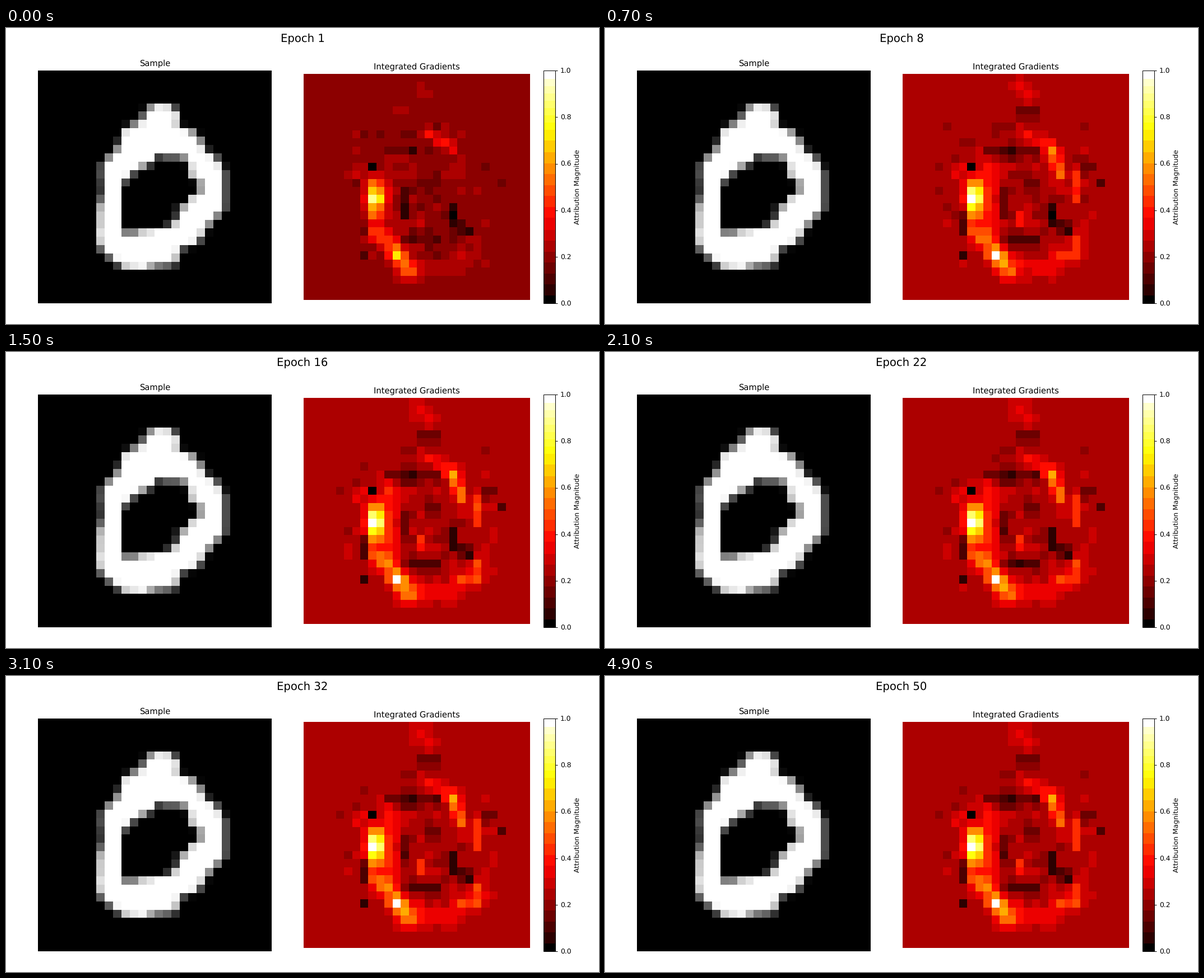
A matplotlib script that plays this animation: 1058 px wide and 529 px high, repeating every 5000 ms.

```python
import numpy as np
import matplotlib.pyplot as plt
from matplotlib.animation import FuncAnimation
from matplotlib.cm import ScalarMappable
from matplotlib.colors import ListedColormap
from matplotlib.path import Path

W, H = 1058, 529
N = 28
EPOCHS = 50
ROWS, COLS = np.mgrid[:N, :N]

plt.rcParams["font.family"] = "DejaVu Sans"
plt.rcParams["text.hinting"] = "none"


# ---------- handwritten zero: two outlines, rasterised by area coverage ----------
OUTER = [(14, 4.1), (15.4, 4), (16.9, 5), (16.8, 6.8), (18.4, 7.2), (19.5, 8.3),
         (20, 9.6), (21.3, 10.4), (22.3, 12), (22.3, 16.9), (21, 17.9),
         (20.2, 19), (19.1, 20.8), (17, 21.4), (16.6, 23.3), (14, 23.5),
         (12.5, 24), (10.2, 23.8), (7.6, 21.6), (7.1, 20.3), (7.3, 16),
         (7.8, 15.3), (7.7, 11.2), (9.7, 9.3), (10.1, 7.2), (12.5, 6), (12.8, 4.9)]
HOLE = [(14.1, 10.1), (16.4, 10.5), (17.1, 10), (18.2, 11.6), (18.2, 12.9),
        (19.4, 13.2), (19.4, 14.9), (18.2, 15.1), (18, 16.1), (16.8, 16.6),
        (16.8, 17.9), (15.3, 19), (12.6, 19.1), (11.8, 19.45), (10, 19.45),
        (10, 13.7), (11.8, 12), (14.1, 10.9)]


def coverage(outline, sub=10):
    t = (np.arange(N * sub) + .5) / sub
    x, y = np.meshgrid(t, t)
    inside = Path(outline).contains_points(np.column_stack([x.ravel(), y.ravel()]))
    return inside.reshape(N, sub, N, sub).mean(axis=(1, 3))


# ---------- stepped "hot" colour scale ----------
def stepped_hot():
    rgb = plt.get_cmap("hot")(np.arange(256))[:, :3]
    step = np.floor(rgb * 8)
    out = (32 * step + 12) / 255
    out[rgb >= 1] = 1
    out[rgb <= 0] = 0
    out[step[:, 0] == 0] = 0
    out[step[:, 2] >= 7] = 1
    return ListedColormap(out)


# ---------- attribution map: soft strokes over a noisy ground ----------
# (path of (column, row) points, width, height at the first and last epoch)
STROKES = [
    ([(8.35, 13.4), (8.35, 16.5)], 1.1, .40, .45),             # hot spot on the left side
    ([(8.3, 14.8)], .95, .40, .40),
    ([(8.5, 19), (10, 20.5), (11.2, 22), (12.5, 24)], 1.1, .28, .26),
    ([(11, 22)], .8, .25, .55),                                # hot spot at the bottom
    ([(10, 10.5), (10.5, 16), (10.5, 19)], 1.2, .05, .14),
    ([(15, 7), (17.5, 8.5)], .8, .18, .14),                    # right arc
    ([(18, 9), (19, 12)], .8, .06, .30),
    ([(21, 12), (21, 15)], .6, .03, .20),
    ([(21, 20), (21, 22), (19, 22)], .9, .06, .20),
    ([(13, 23.3), (18, 23.5)], 1.3, .05, .11),
    ([(14, 1), (15, 2)], 1.2, .03, .09),
    ([(7, 11), (6, 12)], .7, .08, .11),
    ([(14, 17), (14, 18)], .6, .05, .16),
    ([(8, 11)], .5, -.30, -.38),                               # cold spots
    ([(10, 9), (14, 9.3), (16, 9)], .8, -.05, -.14),
    ([(13, 9.3)], .6, -.10, -.10),
    ([(12.5, 20), (16, 20)], .7, -.08, -.15),
    ([(18, 16), (18, 18), (20, 19)], .6, -.15, -.19),
    ([(7, 17), (7, 19)], .5, -.05, -.18),
    ([(7, 22)], .5, -.10, -.16),
    ([(12, 14), (12, 17)], .6, -.14, -.13),
    ([(15.5, 13)], .9, -.03, -.14),
    ([(14, 4.3), (16, 4.4)], .8, -.03, -.11),
    ([(22.4, 11)], .8, -.06, -.14),
    ([(24, 13)], .5, 0, -.18),
]
ENVELOPE = np.exp(-(((ROWS - 14) / 11) ** 4 + ((COLS - 14) / 11) ** 4))


def stroke(points, width):
    t = np.linspace(0, len(points) - 1, 60)
    x, y = (np.interp(t, range(len(points)), axis) for axis in zip(*points))
    gap = (COLS[..., None] - x) ** 2 + (ROWS[..., None] - y) ** 2
    return np.exp(-gap.min(axis=-1) / width ** 2)


def noise(seed):
    return ENVELOPE * np.random.default_rng(seed).normal(size=(N, N))


SHAPES = [(stroke(path, width), first, last) for path, width, first, last in STROKES]
YOUNG = .200 + .022 * noise(4) + sum(s * first for s, first, _ in SHAPES)
GROWN = .247 + .022 * noise(9) + sum(s * last for s, _, last in SHAPES)


def attribution(epoch):
    """Ease from the first map to the settled one with a fading jitter."""
    mix = 1 - np.exp(-(epoch - 1) / 3)
    jitter = (.018 * np.exp(-epoch / 9) + .002) * (epoch > 1)
    out = YOUNG + (GROWN - YOUNG) * mix + jitter * noise(100 + epoch)
    return np.clip(out, 0, 1)


# ---------- stage ----------
fig = plt.figure(figsize=(12, 6), dpi=88.17, facecolor="white")


def pixel_axes(x0, y0, x1, y1):
    return fig.add_axes([x0 / W, 1 - y1 / H, (x1 - x0) / W, (y1 - y0) / H])


def panel(box, title, data, cmap):
    ax = pixel_axes(*box)
    img = ax.imshow(data, cmap=cmap, vmin=0, vmax=1, aspect="auto",
                    interpolation="nearest")
    ax.set_title(title, fontsize=12, pad=6.6)
    ax.axis("off")
    return img


hot = stepped_hot()
panel((57, 76, 473.6, 492), "Sample", coverage(OUTER) - coverage(HOLE), "gray")
heat = panel((530.8, 82, 934.3, 485.6), "Integrated Gradients", attribution(1), hot)

bar = fig.colorbar(ScalarMappable(cmap=hot), cax=pixel_axes(959, 76, 980.2, 492.4))
bar.set_label("Attribution Magnitude")
heading = fig.suptitle("Epoch 1", fontsize=16, y=.9815)


def update(i):
    heat.set_data(attribution(i + 1))
    heading.set_text(f"Epoch {i + 1}")
    return heat, heading


anim = FuncAnimation(fig, update, frames=EPOCHS, interval=100, repeat=True,
                     repeat_delay=0, blit=False)
plt.show()
```
